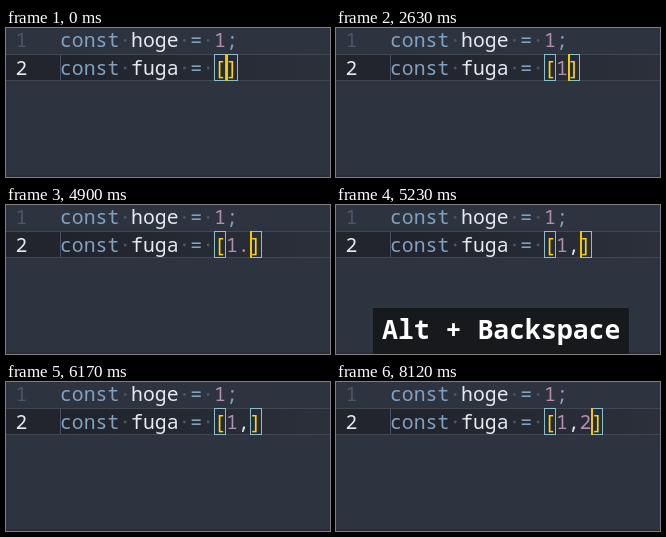
These frames come from a looping animation (324 px wide and 149 px high, 8520 ms). An HTML page with a canvas:

```html
<!DOCTYPE html>
<html lang="en">
<head>
<meta charset="utf-8">
<title>Typing in an editor</title>
<style>
  html, body { margin: 0; width: 100%; height: 100%; overflow: hidden; background: #2e3340; }
  canvas { display: block; width: 324px; height: 149px; }
</style>
</head>
<body>
<canvas id="stage"></canvas>
<script>
const W = 324, H = 149, LOOP = 8520;
const LEFT = 54, CHAR = 11.85;
const ROWS = [19, 46.5];
const CODE_FONT = '19.75px "Noto Sans Mono", monospace';
const KEY_FONT = '600 26.5px "Noto Sans Mono", monospace';
const COLOR = {
  back: '#2e3340', keyword: '#81a1c1', name: '#e5e9f0', number: '#b48ead',
  dot: '#4c566a', bracket: '#ffd700', match: '#88c0d0', cursor: '#f5c800'
};

// Text between the brackets, and the moments the cursor toggles.
const EDITS = [[0, ''], [1620, '1'], [2900, '1.'], [5230, '1,'], [7110, '1,2']];
const BLINKS = [
  [0, 330, 810, 1290], [1620, 2150, 2630], [2900, 3360, 3890, 4350, 4900],
  [5230, 5900, 6370, 6830], [7110, 7590, 8120]
];
const KEY_SHOWN = [5230, 6170];

const canvas = document.getElementById('stage');
const ratio = window.devicePixelRatio || 1;
canvas.width = Math.round(W * ratio);
canvas.height = Math.round(H * ratio);
const ctx = canvas.getContext('2d');
ctx.scale(ratio, ratio);

const columnX = col => LEFT + col * CHAR;

function rect(x, y, w, h, color) {
  ctx.fillStyle = color;
  ctx.fillRect(x, y, w, h);
}

function text(str, x, y, color, font = CODE_FONT) {
  ctx.font = font;
  ctx.fillStyle = color;
  ctx.fillText(str, x, y);
}

function code(str, col, row, color) {
  text(str, columnX(col), ROWS[row], color);
}

function declaration(name, row) {
  code('const', 0, row, COLOR.keyword);
  code(name, 6, row, COLOR.name);
  code('=', 11, row, COLOR.keyword);
  ctx.fillStyle = COLOR.dot;
  for (const col of [5, 10, 12]) {
    ctx.beginPath();
    ctx.arc(columnX(col + 0.5), ROWS[row] - 6.5, 1.4, 0, Math.PI * 2);
    ctx.fill();
  }
}

function activeLine() {
  const shade = ctx.createLinearGradient(LEFT, 0, W, 0);
  shade.addColorStop(0, '#20232b');
  shade.addColorStop(1, '#2b303b');
  rect(0, 26, W, 27, '#43464f');
  rect(0, 27, LEFT, 25, '#22252d');
  rect(LEFT, 27, W - LEFT, 25, shade);
  rect(LEFT, 27, 1, 25, '#465064');
}

function bracket(char, col) {
  const x = Math.round(columnX(col));
  ctx.strokeStyle = COLOR.match;
  ctx.lineWidth = 1;
  ctx.strokeRect(x + 0.5, 26.5, 11, 26);
  code(char, col, 1, COLOR.bracket);
}

function keyLabel() {
  rect(37, 103, 256, 46, '#17191d');
  text('Alt + Backspace', 46, 134, '#ffffff', KEY_FONT);
}

function draw(t) {
  const step = EDITS.filter(([start]) => start <= t).length - 1;
  const typed = EDITS[step][1];
  const end = 14 + typed.length;
  const cursorOn = BLINKS[step].filter(time => time <= t).length % 2 === 1;

  rect(0, 0, W, H, COLOR.back);
  rect(0, 147, W, 2, '#2d2b38');
  activeLine();

  text('1', 9.5, ROWS[0], COLOR.dot);
  text('2', 9.5, ROWS[1], COLOR.name);
  declaration('hoge', 0);
  code('1', 13, 0, COLOR.number);
  code(';', 14, 0, COLOR.keyword);

  declaration('fuga', 1);
  bracket('[', 13);
  [...typed].forEach((char, i) =>
    code(char, 14 + i, 1, char === ',' ? COLOR.name : COLOR.number));
  bracket(']', end);
  if (cursorOn) rect(Math.round(columnX(end)), 26, 2, 27, COLOR.cursor);

  if (t >= KEY_SHOWN[0] && t < KEY_SHOWN[1]) keyLabel();
}

const begin = performance.now();
function tick() {
  draw((performance.now() - begin) % LOOP);
  requestAnimationFrame(tick);
}
tick();
</script>
</body>
</html>
```
